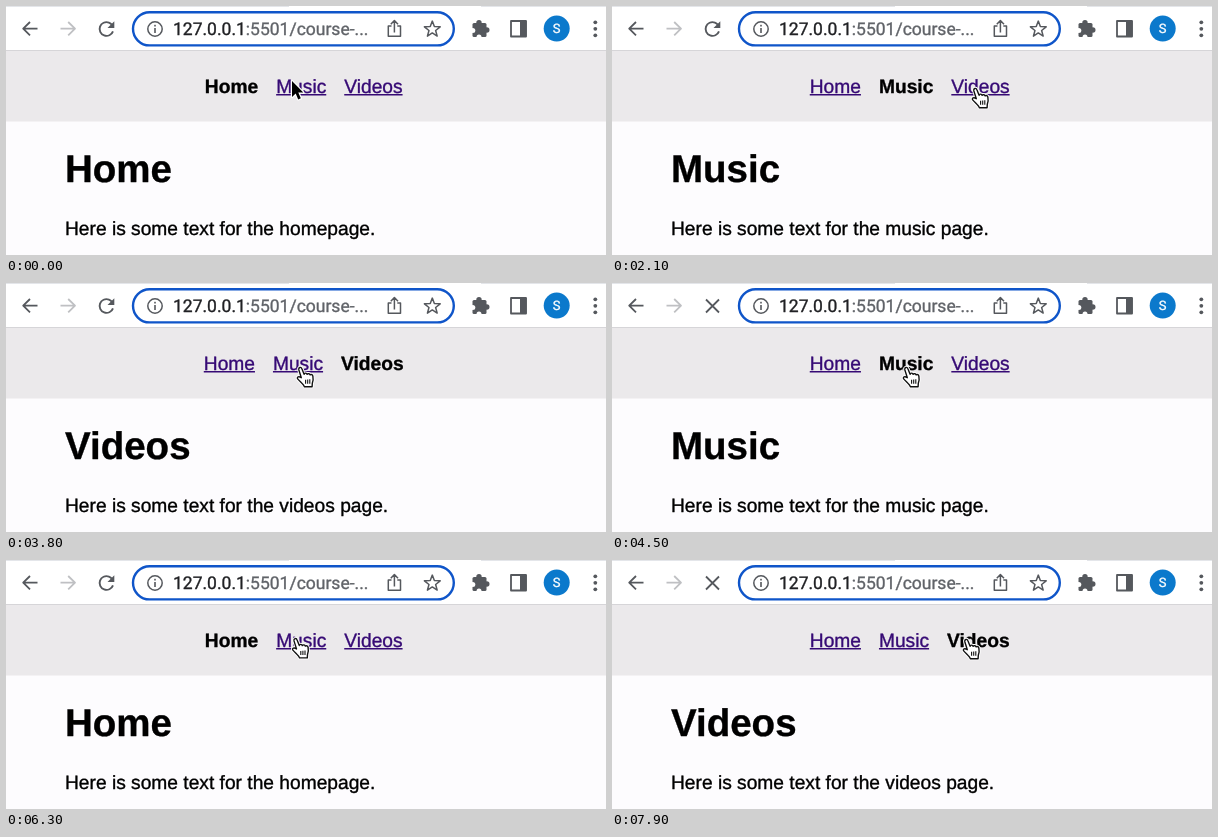
An HTML page with a canvas for the animation above (8000 ms loop, 600 px wide and 249 px high).

```html
<!DOCTYPE html>
<html lang="en">
<head>
<meta charset="utf-8">
<title>Page navigation</title>
<style>
html, body { margin: 0; width: 100%; height: 100%; overflow: hidden; background: #fdfcfe; }
canvas { display: block; width: 600px; height: 249px; }
</style>
</head>
<body>
<canvas id="stage"></canvas>
<script>
const W = 600, H = 249, LOOP = 8000, STEP = 100;
const canvas = document.getElementById('stage');
const ctx = canvas.getContext('2d');
const dpr = window.devicePixelRatio || 1;
canvas.width = W * dpr;
canvas.height = H * dpr;

const PAGE_FONT = '"Liberation Sans", Arial, sans-serif';
const UI_FONT = 'Roboto, Inter, sans-serif';
const ICON = '#55585d', LINK = '#360a75';

const links = ['Home', 'Music', 'Videos'];
const texts = ['homepage', 'music page', 'videos page'].map(s => `Here is some text for the ${s}.`);

// Time and index of the page shown from then on
const visits = [[0, 0], [1400, 1], [3000, 2], [4400, 1], [5500, 0], [6900, 1], [7800, 2]];
const loading = [[1000, 1600], [2800, 3200], [4100, 4700], [5200, 5700], [6700, 7200], [7600, 8000]];

// Time, x, y of the pointer
const track = [
  [0, 283, 75], [100, 283, 75], [500, 293, 82], [1600, 293, 82], [2100, 359.3, 81.3],
  [3100, 359.3, 81.3], [3500, 235, 85], [3800, 290.3, 83.3], [4600, 290.3, 83.3], [5100, 224.3, 79.3],
  [5800, 224.3, 79.3], [6300, 285.5, 77.5], [6600, 290, 82], [6900, 290, 82], [7400, 350.3, 78.3],
  [8000, 350.3, 78.3]
];

const handShape = new Path2D('M5 11.4L2.5 3.4C2 1 4.8 .2 5.6 2.4L7.8 8C8 6.6 10.4 6.4 10.8 8' +
  'C11.6 7 13.4 7.2 13.8 8.6C14.8 7.8 16.4 8.4 16.6 10C17.2 13 17 14.5 16 17L15.8 20.4L8 20.4' +
  'C7.4 18 4 15.6 1.4 12.6C.2 10.6 2.6 9.6 5 11.4Z');
const palmLines = new Path2D('M9.3 13.4V17.4M11.4 13.2V17.4M13.5 13V17.4');
const arrowShape = new Path2D('M0 0V16L3.7 12.6L6.2 18.4L8.8 17.3L6.3 11.6H11.3Z');
const beamShape = new Path2D('M-4 -9Q0 -9 0 -6V6Q0 9 -4 9M4 -9Q0 -9 0 -6M0 6Q0 9 4 9M-2.5 2.5H2.5');

function stroke(path, color, width) {
  ctx.strokeStyle = color;
  ctx.lineWidth = width;
  ctx.stroke(path);
}

function fill(path, color) {
  ctx.fillStyle = color;
  ctx.fill(path);
}

function rect(x, y, w, h, color) {
  ctx.fillStyle = color;
  ctx.fillRect(x, y, w, h);
}

function dot(x, y, r, color) {
  const p = new Path2D();
  p.arc(x, y, r, 0, Math.PI * 2);
  fill(p, color);
}

// The thin outline gives the heavier look of smoothed screen type
function text(str, x, y, font, color) {
  ctx.font = font;
  ctx.fillStyle = ctx.strokeStyle = color;
  ctx.lineWidth = 0.35;
  ctx.fillText(str, x, y);
  ctx.strokeText(str, x, y);
  return ctx.measureText(str).width;
}

function at(x, y, draw) {
  ctx.save();
  ctx.translate(x, y);
  draw();
  ctx.restore();
}

function drawReload() {
  const p = new Path2D();
  p.arc(100.5, 23, 6.9, 0.35, Math.PI * 1.78);
  stroke(p, ICON, 1.9);
  fill(new Path2D('M108.3 15.2V22H101.5Z'), ICON);
}

function drawStar() {
  const p = new Path2D();
  for (let i = 0; i < 10; i++) {
    const r = i % 2 ? 3.5 : 8.3, a = i * Math.PI / 5 - Math.PI / 2;
    p.lineTo(426.3 + r * Math.cos(a), 23.4 + r * Math.sin(a));
  }
  p.closePath();
  stroke(p, ICON, 1.5);
}

function drawPuzzle() {
  const p = new Path2D();
  p.roundRect(466.5, 17, 14, 14, 1.5);
  fill(p, ICON);
  dot(473, 16.7, 2.7, ICON);
  dot(480.8, 24, 2.7, ICON);
  dot(466.8, 24.5, 2.5, '#fff');
  dot(473, 31, 2.5, '#fff');
}

function drawToolbar(busy) {
  rect(0, 0, W, 44, '#fff');
  rect(0, 44, W, 1, '#d6d5d8');
  rect(0, 0, 283, 1, '#e4e6ea');
  rect(475, 0, W - 475, 1, '#e4e6ea');

  const back = 'M31.5 22.7H17.5M24 16L17.2 22.7L24 29.4';
  const forward = 'M54.5 22.7H69M62.2 16L69 22.7L62.2 29.4';
  stroke(new Path2D(back), ICON, 1.8);
  stroke(new Path2D(forward), '#bfc0c3', 1.8);
  if (busy) stroke(new Path2D('M94 16.5L107 29.5M107 16.5L94 29.5'), ICON, 1.8);
  else drawReload();

  const pill = new Path2D();
  pill.roundRect(127, 6.2, 320.8, 33.2, 16.6);
  fill(pill, '#fff');
  stroke(pill, '#0f55c9', 2.4);

  const info = new Path2D();
  info.arc(149, 23, 7.2, 0, Math.PI * 2);
  stroke(info, ICON, 1.5);
  rect(148.2, 22, 1.6, 5, ICON);
  rect(148.2, 18.8, 1.6, 1.7, ICON);

  const font = `17.5px ${UI_FONT}`;
  const w = text('127.0.0.1', 167, 28.8, font, '#202124');
  text(':5501/course-...', 167 + w, 28.8, font, '#606368');

  stroke(new Path2D('M385.5 20H382.3V30.3H394.5V20H391.3M388.4 26.5V15M384.8 18.2L388.4 14.5L392 18.2'), ICON, 1.5);
  drawStar();
  drawPuzzle();

  stroke(new Path2D('M505 15H520V30.5H505Z'), ICON, 1.8);
  rect(514, 15, 6.5, 15.5, ICON);

  dot(550.7, 22.6, 13, '#0b79cc');
  ctx.textAlign = 'center';
  text('S', 550.7, 27.2, `13px ${UI_FONT}`, '#fff');
  ctx.textAlign = 'left';
  for (const y of [16.3, 22.8, 29.3]) dot(589.3, y, 1.9, ICON);
}

function drawPage(page) {
  rect(0, 45, W, 70.5, '#ebe9eb');
  const gap = 18;
  const fontOf = i => `${i === page ? 'bold ' : ''}19.2px ${PAGE_FONT}`;
  const widths = links.map((name, i) => {
    ctx.font = fontOf(i);
    return ctx.measureText(name).width;
  });
  let x = 297.7 - (widths.reduce((a, b) => a + b) + 2 * gap) / 2;
  links.forEach((name, i) => {
    const current = i === page;
    text(name, x, 86.6, fontOf(i), current ? '#000' : LINK);
    if (!current) rect(x, 88, widths[i], 1.5, LINK);
    x += widths[i] + gap;
  });
  text(links[page], 59, 176.4, `bold 38.5px ${PAGE_FONT}`, '#000');
  text(texts[page], 59, 228.5, `19.22px ${PAGE_FONT}`, '#000');
}

function pointerAt(t) {
  const i = track.findIndex(k => k[0] > t);
  const [t0, x0, y0] = track[i - 1], [t1, x1, y1] = track[i];
  const u = (t - t0) / (t1 - t0), e = u * u * (3 - 2 * u);
  return [x0 + (x1 - x0) * e, y0 + (y1 - y0) * e];
}

function drawPointer(t) {
  const [x, y] = pointerAt(t);
  if (t < 300) {
    at(x + 3, y, () => {
      stroke(arrowShape, '#fff', 2.4);
      fill(arrowShape, '#000');
    });
  } else if (t >= 1200 && t < 1500) {
    at(x + 5.5, y, () => {
      stroke(beamShape, '#fff', 3.4);
      stroke(beamShape, '#111', 1.5);
    });
  } else {
    at(x, y, () => {
      stroke(handShape, '#fff', 3.2);
      fill(handShape, '#fff');
      stroke(handShape, '#111', 1.4);
      stroke(palmLines, '#111', 1.1);
    });
  }
}

function render(t) {
  ctx.setTransform(dpr, 0, 0, dpr, 0, 0);
  ctx.lineJoin = 'round';
  ctx.textRendering = 'geometricPrecision';
  rect(0, 0, W, H, '#fdfcfe');
  const page = visits.filter(v => v[0] <= t).pop()[1];
  drawPage(page);
  drawToolbar(loading.some(([a, b]) => t >= a && t < b));
  drawPointer(t);
}

const start = performance.now();
function tick() {
  const t = (performance.now() - start) % LOOP;
  render(Math.floor(t / STEP) * STEP);
  requestAnimationFrame(tick);
}
tick();
</script>
</body>
</html>
```
